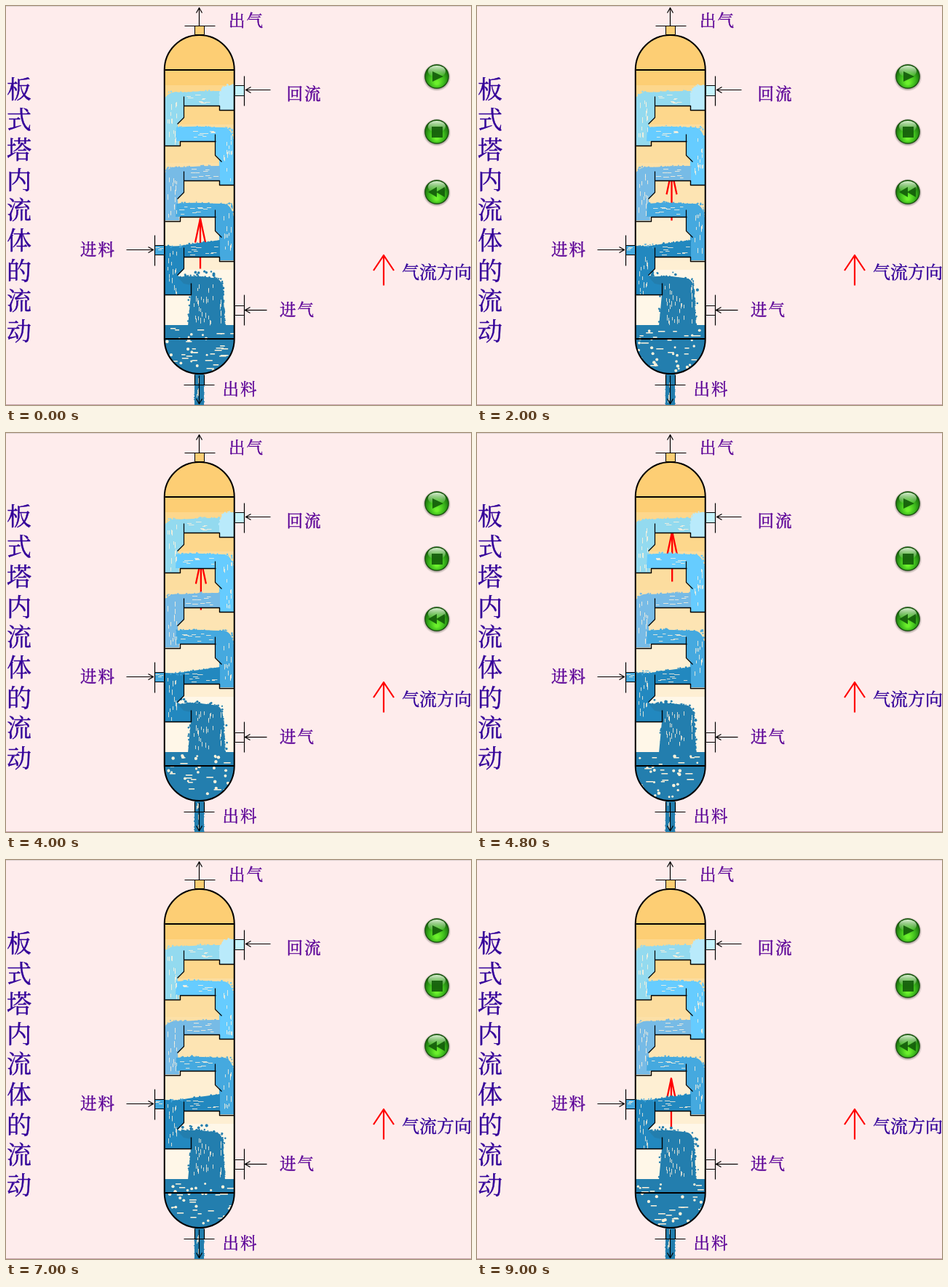
These frames come from a looping animation (639 by 549 pixels, 9.1 s). An HTML page with a canvas:

```html
<!DOCTYPE html>
<html lang="zh">
<head>
<meta charset="utf-8">
<style>
html, body { margin: 0; width: 100%; height: 100%; overflow: hidden; background: #feecec; }
canvas { display: block; }
</style>
</head>
<body>
<canvas id="stage" width="639" height="549"></canvas>
<script>
const ctx = document.getElementById('stage').getContext('2d');
const STEP = 100, STEPS = 91;
const CREAM = '#fff3dc', DEEP = '#237eae';
ctx.lineJoin = 'round';

function random(seed) {
  let s = (seed * 7919 + 12345) >>> 0;
  return () => {
    s = (s + 0x6d2b79f5) >>> 0;
    let t = Math.imul(s ^ (s >>> 15), 1 | s);
    t = (t + Math.imul(t ^ (t >>> 7), 61 | t)) ^ t;
    return ((t ^ (t >>> 14)) >>> 0) / 4294967296;
  };
}

function rect(x, y, w, h, color) {
  ctx.fillStyle = color;
  ctx.fillRect(x, y, w, h);
}

// Points are pixel centres
function line(points, color = '#000', width = 1.2) {
  ctx.beginPath();
  for (let i = 0; i < points.length; i += 2) ctx.lineTo(points[i] + 0.5, points[i + 1] + 0.5);
  ctx.strokeStyle = color;
  ctx.lineWidth = width;
  ctx.stroke();
}

function dot(x, y, r, color) {
  ctx.fillStyle = color;
  ctx.beginPath();
  ctx.arc(x, y, r, 0, 7);
  ctx.fill();
}

function text(str, x, y, size, color, family) {
  ctx.font = size + 'px ' + family;
  ctx.fillStyle = ctx.strokeStyle = color;
  ctx.lineWidth = 0.4;
  ctx.textAlign = 'center';
  ctx.textBaseline = 'middle';
  ctx.fillText(str, x, y);
  ctx.strokeText(str, x, y);
}

// Thin arrow pointing along (dx, dy)
function pointer(x, y, dx, dy, len) {
  line([x - dx * len, y - dy * len, x, y]);
  const bx = x - dx * 7, by = y - dy * 7;
  line([bx - dy * 4, by + dx * 4, x, y, bx + dy * 4, by - dx * 4]);
}

// Liquid body with a smooth, spraying surface; rest closes the outline
function liquid(color, surface, rest, rnd) {
  ctx.beginPath();
  ctx.moveTo(surface[0], surface[1]);
  for (let i = 2; i < surface.length - 2; i += 2) {
    const last = i + 4 >= surface.length;
    const ex = last ? surface[i + 2] : (surface[i] + surface[i + 2]) / 2;
    const ey = last ? surface[i + 3] : (surface[i + 1] + surface[i + 3]) / 2;
    ctx.quadraticCurveTo(surface[i], surface[i + 1], ex, ey);
  }
  for (let i = 0; i < rest.length; i += 2) ctx.lineTo(rest[i], rest[i + 1]);
  ctx.fillStyle = color;
  ctx.fill();
  for (let i = 0; i + 3 < surface.length; i += 2) {
    const dx = surface[i + 2] - surface[i], dy = surface[i + 3] - surface[i + 1];
    const n = Math.hypot(dx, dy) / 2.5;
    for (let k = 0; k < n; k++) {
      const u = rnd();
      dot(surface[i] + dx * u, surface[i + 1] + dy * u + rnd() * 3 - 0.8, 0.7 + rnd() * 0.7, color);
    }
  }
}

// Streaks carried through a box; dir: 1 or -1 horizontal, 0 falling
function streaks(x, y, w, h, n, dir, step, seed) {
  const rnd = random(seed), len = dir ? w : h;
  const turns = Math.round(4.5 * STEPS / len);
  ctx.globalAlpha = 0.8;
  for (let i = 0; i < n; i++) {
    const size = 4 + rnd() * 4, across = rnd();
    let p = (rnd() + turns * step / STEPS) % 1;
    if (dir < 0) p = 1 - p;
    p *= len - size;
    if (dir) rect(Math.round(x + p), Math.round(y + across * (h - 1)), size, 1, CREAM);
    else rect(Math.round(x + across * (w - 1)), Math.round(y + p), 1, size, CREAM);
  }
  ctx.globalAlpha = 1;
}

function leftFlow(top, floor, color, rnd) {
  const end = floor + 55;
  liquid(color, [294, top - 1, 270, top - 1, 244, top + 1, 224, top, 218, top + 9],
    [218, end, 238, end, 236, floor + 26, 245, floor + 16, 245, floor, 294, floor], rnd);
}

function rightFlow(top, floor, color, rnd) {
  const end = floor + 60;
  liquid(color, [234, top + 1, 256, top - 1, 286, top + 1, 310, top + 1, 313, top + 20],
    [313, end, 293, end, 293, floor + 24, 288, floor + 19, 288, floor, 239, floor, 233, floor], rnd);
}

function leftTray(floor) {
  line([244, floor - 13, 244, floor + 16, 235, floor + 25]);
  line([244, floor, 293, floor, 293, floor + 6, 313, floor + 6], '#000', 1.4);
}

function rightTray(floor) {
  line([287, floor - 10, 287, floor + 19, 296, floor + 28]);
  line([218, floor + 6, 239, floor + 6, 239, floor, 288, floor], '#000', 1.4);
}

const path = [[0, 291], [6, 258], [12, 230], [17, 225], [29, 224], [40, 173],
  [56, 95], [60, 72], [63, 54]];

function arrowTip(step) {
  if (step >= 78) return 371 - (step - 78) * 6;
  for (let i = 1; i < path.length; i++) {
    const [a, ya] = path[i - 1], [b, yb] = path[i];
    if (step <= b) return ya + (yb - ya) * (step - a) / (b - a);
  }
  return null;
}

function gasArrow(step) {
  const y = arrowTip(step);
  if (y === null) return;
  const x = 266.5 + (291 - y) * 0.0075;
  line([x, y + 1, x, y + 70], '#f00', 2.3);
  line([x - 7, y + 34, x, y + 1, x + 7, y + 34], '#f00', 2.3);
}

function shell() {
  ctx.beginPath();
  ctx.arc(265.75, 88, 48, Math.PI, 0);
  ctx.lineTo(313.75, 458);
  ctx.arc(265.75, 458, 48, 0, Math.PI);
  ctx.closePath();
}

const bands = [[40, '#fdce74'], [109, '#fdd78c'], [163, '#fcdd9f'], [216, '#fce0a7'],
  [240, '#fde4b3'], [290, '#feefd3'], [363, '#fff7e8']];

function column(step) {
  const rnd = random(step + 500);
  ctx.save();
  shell();
  ctx.clip();
  bands.forEach(([y, color]) => rect(217, y, 98, 510 - y, color));
  gasArrow(step);

  leftFlow(118, 137, '#93daef', rnd);
  liquid('#b9eafb', [293, 126, 295, 114, 303, 109, 314, 109], [314, 143, 293, 143], rnd);
  rightFlow(166, 186, '#66ccff', rnd);
  leftFlow(221, 240, '#77bbe6', rnd);
  rightFlow(271, 290, '#45a9df', rnd);
  liquid('#2288bf', [294, 322, 272, 325, 250, 328, 234, 331, 218, 330],
    [218, 397, 254, 397, 254, 381, 236, 371, 245, 361, 245, 345, 294, 345], rnd);
  liquid(DEEP, [236, 373, 256, 371, 278, 373, 297, 376, 299, 402, 301, 440],
    [250, 440, 254, 397, 254, 384, 244, 382], rnd);
  for (let i = 0; i < 18; i++) {
    const right = rnd() < 0.45;
    const x = right ? 291 + rnd() * 13 : 236 + rnd() * 50;
    const y = right ? 378 + rnd() * 60 : 365 + rnd() * 9;
    dot(x, y, 1 + rnd() * 1.1, DEEP);
  }
  for (let i = 0; i < 8; i++) {
    dot(250 + rnd() * 4, 399 + rnd() * 40, 1.3, DEEP);
    dot(225 + rnd() * 18, 327 + rnd() * 6, 0.9, '#45a9df');
  }
  rect(217, 439, 98, 70, DEEP);

  [[119, 137], [222, 240], [328, 345]].forEach(([top, floor], i) => {
    streaks(246, top + 2, 47, floor - top - 4, 10, -1, step, i + 1);
    streaks(221, top + 7, 15, floor + 48 - top, 15, 0, step, i + 11);
  });
  [[168, 186], [273, 290]].forEach(([top, floor], i) => {
    streaks(238, top + 2, 50, floor - top - 4, 10, 1, step, i + 21);
    streaks(298, top + 10, 13, floor + 46 - top, 14, 0, step, i + 31);
  });
  streaks(257, 382, 40, 57, 34, 0, step, 41);

  for (let i = 0; i < 40; i++) {
    const x = 221 + rnd() * 88, y = 443 + rnd() * 59;
    if (rnd() < 0.6) dot(x, y, 1.4 + rnd() * 0.9, CREAM);
    else rect(x, Math.round(y), 5 + rnd() * 6, 1.5, CREAM);
  }
  ctx.restore();

  [137, 240, 345].forEach(leftTray);
  [186, 290].forEach(rightTray);
  line([218, 397, 254, 397, 254, 381], '#000', 1.4);
  line([218, 87.5, 313, 87.5], '#000', 2);
  line([218, 457.5, 313, 457.5], '#000', 2);
  shell();
  ctx.lineWidth = 2;
  ctx.strokeStyle = '#000';
  ctx.stroke();
}

function nozzle(x, y, w, h, color) {
  rect(x, y, w, h, color);
  ctx.lineWidth = 1;
  ctx.strokeStyle = '#000';
  ctx.strokeRect(x + 0.5, y + 0.5, w - 1, h - 1);
}

function nozzles(step) {
  nozzle(259, 27, 14, 13, '#fdce74');
  line([245, 27, 287, 27]);
  pointer(265, 2, 0, -1, 25);

  nozzle(314, 109, 14, 15, '#c5f3fd');
  line([327, 96, 327, 137]);
  pointer(329, 115, -1, 0, 34);

  nozzle(204, 329, 14, 14, '#45a9df');
  streaks(205, 331, 12, 10, 3, 1, step, 51);
  line([204, 315, 204, 357]);
  pointer(202, 335, 1, 0, 37);

  nozzle(314, 412, 14, 14, '#feecec');
  line([327, 397, 327, 439]);
  pointer(328, 418, -1, 0, 30);

  rect(259, 507, 13, 42, DEEP);
  const rnd = random(step + 900);
  for (let i = 0; i < 12; i++) dot((i % 2 ? 272 : 259) + rnd() - 0.5, 523 + rnd() * 26, 0.8, DEEP);
  streaks(261, 508, 9, 40, 5, 0, step, 61);
  line([259, 507, 259, 521]);
  line([272, 507, 272, 521]);
  line([244, 521, 286, 521]);
  pointer(265, 547, 0, 1, 39);
}

function button(y, icon) {
  const x = 592;
  const halo = ctx.createRadialGradient(x, y + 1, 15, x, y + 1, 19.5);
  halo.addColorStop(0, 'rgba(90,90,80,.8)');
  halo.addColorStop(1, 'rgba(160,150,145,0)');
  dot(x, y + 1, 19.5, halo);
  dot(x, y, 16.8, '#174f0d');
  const g = ctx.createRadialGradient(x, y + 9, 2, x, y + 3, 17);
  g.addColorStop(0, '#6cf02c');
  g.addColorStop(0.55, '#3cb91c');
  g.addColorStop(1, '#1b700e');
  dot(x, y, 15.6, g);
  const shine = ctx.createLinearGradient(0, y - 15, 0, y);
  shine.addColorStop(0, 'rgba(240,255,232,.9)');
  shine.addColorStop(1, 'rgba(200,240,185,.05)');
  ctx.fillStyle = shine;
  ctx.beginPath();
  ctx.ellipse(x, y - 7, 12, 8, 0, 0, 7);
  ctx.fill();
  ctx.fillStyle = 'rgba(16,88,8,.88)';
  ctx.beginPath();
  icon.forEach(shape => {
    shape.forEach(([dx, dy], i) => ctx[i ? 'lineTo' : 'moveTo'](x + dx, y + dy));
    ctx.closePath();
  });
  ctx.fill();
}

const labels = [['出气', 330.5, 20], ['回流', 410, 121], ['进料', 126.5, 335],
  ['进气', 400.5, 418], ['出料', 322, 527]];
const SERIF = '"Noto Serif CJK SC", "Noto Sans CJK SC", "Noto Sans CJK", serif';
const KAI = 'KaiTi, ' + SERIF;

function surroundings() {
  rect(0, 0, 639, 549, '#feecec');
  rect(0, 0, 639, 1, '#dfd2d2');
  rect(0, 548, 639, 1, '#c9a3ab');
  [...'板式塔内流体的流动'].forEach((c, i) => text(c, 18, 114 + i * 41.6, 34, '#330099', SERIF));
  ctx.letterSpacing = '2px';
  labels.forEach(([str, x, y]) => text(str, x, y - 0.5, 22.5, '#5a0096', KAI));
  ctx.letterSpacing = '0px';
  text('气流方向', 592, 365.5, 24, '#330099', SERIF);
  line([518.5, 384, 518.5, 343], '#f00', 2.2);
  line([504.5, 363.5, 518.5, 342.5, 532.5, 363.5], '#f00', 2.2);
  button(97, [[[-6, -7], [9, 0], [-6, 7]]]);
  button(173, [[[-7, -7], [8, -7], [8, 8], [-7, 8]]]);
  button(256, [[[0, -7], [-12, 0], [0, 7]], [[11, -7], [-1, 0], [11, 7]]]);
}

const start = performance.now();
let shown = -1;

function frame() {
  const step = Math.floor((performance.now() - start) / STEP) % STEPS;
  if (step !== shown) {
    shown = step;
    surroundings();
    column(step);
    nozzles(step);
  }
  requestAnimationFrame(frame);
}
frame();
</script>
</body>
</html>
```
